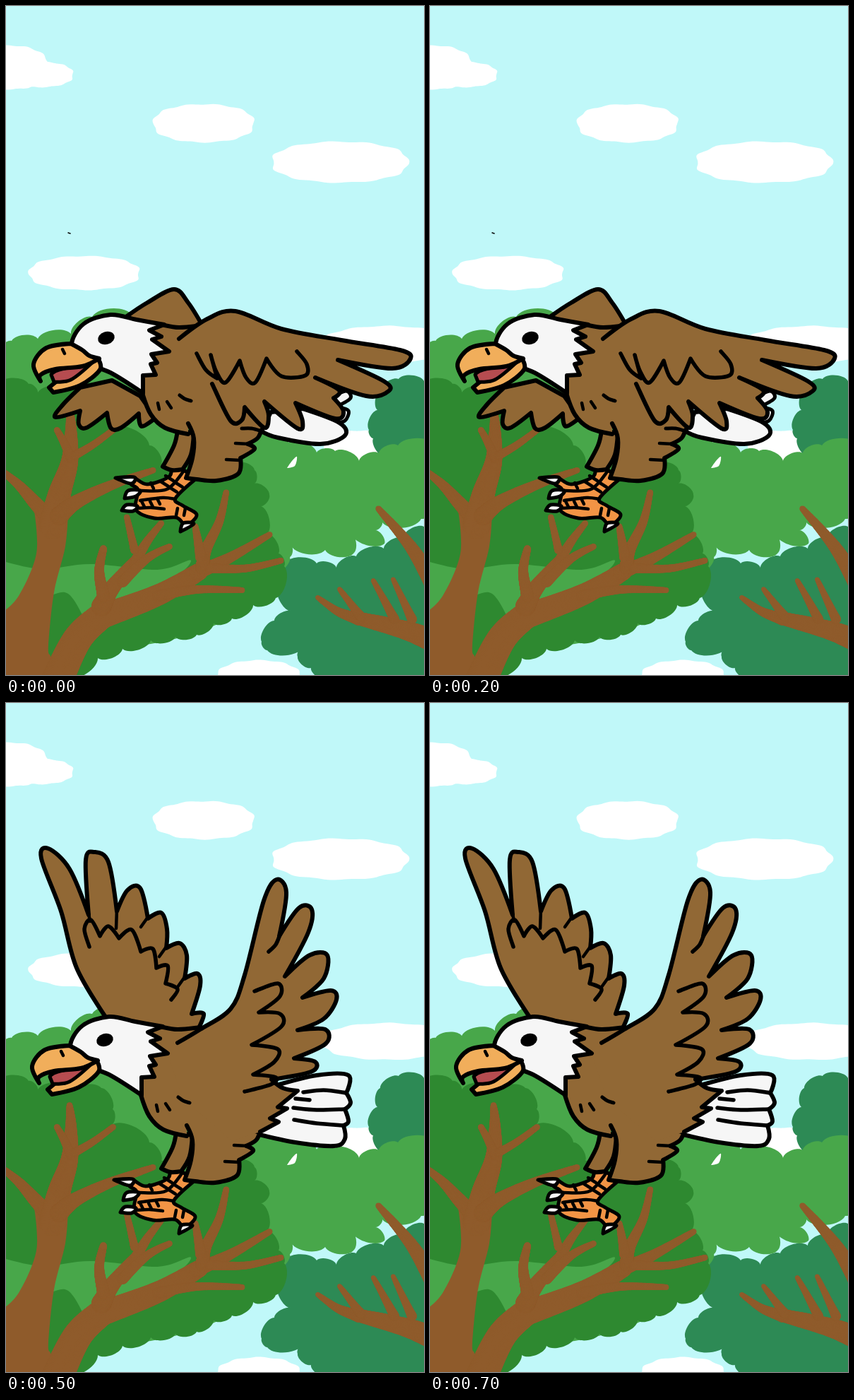
An HTML page with a canvas that plays this animation: 592x947 px, repeating every 1800 ms.

```html
<!DOCTYPE html>
<html lang="en">
<head>
<meta charset="utf-8">
<title>Flying eagle</title>
<style>
  html, body { margin: 0; width: 100%; height: 100%; overflow: hidden; background: #c0f8f9; }
  canvas { display: block; }
</style>
</head>
<body>
<canvas id="stage" width="592" height="947"></canvas>
<script>
const ctx = document.getElementById('stage').getContext('2d');
const SKY = '#c0f8f9', LEAF = '#48a74a', DARK_LEAF = '#2e8930', TEAL = '#2d8a55', WOOD = '#8f5b2b';
const FEATHER = '#916835', WHITE = '#f6f6f6', BEAK = '#f1ae5b', MOUTH = '#b64c50', FOOT = '#f29445';

// Points are "x,y"; a trailing "!" marks a sharp corner.
function parse(text) {
  return text.trim().split(/\s+/).map(item => {
    const [x, y] = item.split(',').map(parseFloat);
    return { x, y, sharp: item.endsWith('!') };
  });
}

// Smooth curve through all points.
function trace(text, closed) {
  const pts = parse(text), n = pts.length;
  const at = i => closed ? pts[(i + n) % n] : pts[Math.max(0, Math.min(n - 1, i))];
  const handle = (p, from, to) => p.sharp ? [p.x, p.y] : [p.x + (to.x - from.x) / 6, p.y + (to.y - from.y) / 6];
  ctx.beginPath();
  ctx.moveTo(pts[0].x, pts[0].y);
  for (let i = 0; i < (closed ? n : n - 1); i++) {
    const a = at(i), b = at(i + 1);
    ctx.bezierCurveTo(...handle(a, at(i - 1), b), ...handle(b, at(i + 2), a), b.x, b.y);
  }
  if (closed) ctx.closePath();
}

function fill(color, text) {
  trace(text, true);
  ctx.fillStyle = color;
  ctx.fill();
}

function line(width, text) {
  trace(text, false);
  ctx.lineWidth = width;
  ctx.stroke();
}

function inked(color, text, width = 6) {
  fill(color, text);
  ctx.lineWidth = width;
  ctx.stroke();
}

function ticks(text, dx, dy) {
  for (const { x, y } of parse(text)) line(4.5, `${x},${y} ${x + dx},${y + dy}`);
}

function shifted(dx, dy, draw) {
  ctx.save();
  ctx.translate(dx, dy);
  draw();
  ctx.restore();
}

function cloud(x, y, rx, ry) {
  ctx.beginPath();
  for (let a = 0; a < 2 * Math.PI; a += 0.05) {
    const wobble = 1 + 0.025 * Math.sin(11 * a + x), s = Math.sin(a);
    ctx.lineTo(x + rx * wobble * Math.cos(a), y + ry * wobble * Math.sign(s) * Math.abs(s) ** 0.8);
  }
  ctx.fillStyle = '#fff';
  ctx.fill();
}

// Leaf mass: a bump swells outward between each pair of points, clockwise.
function foliage(color, text) {
  const pts = parse(text);
  ctx.beginPath();
  ctx.moveTo(pts[0].x, pts[0].y);
  pts.forEach((a, i) => {
    const b = pts[(i + 1) % pts.length], dx = b.x - a.x, dy = b.y - a.y;
    ctx.bezierCurveTo(a.x + dx * 0.15 + dy * 0.25, a.y + dy * 0.15 - dx * 0.25,
      b.x - dx * 0.15 + dy * 0.25, b.y - dy * 0.15 - dx * 0.25, b.x, b.y);
  });
  ctx.fillStyle = color;
  ctx.fill();
}

// Limb whose radius tapers along a chain of points.
function branch(r0, r1, text) {
  const pts = parse(text), last = pts.length - 1;
  const spline = (key, i, u) => {
    const [p, a, b, q] = [-1, 0, 1, 2].map(k => pts[Math.max(0, Math.min(last, i + k))][key]);
    return a + u * (b - p + u * (2 * p - 5 * a + 4 * b - q + u * (3 * (a - b) + q - p))) / 2;
  };
  ctx.fillStyle = WOOD;
  for (let t = 0; t <= last; t += 0.02) {
    const i = Math.min(last - 1, Math.floor(t));
    ctx.beginPath();
    ctx.arc(spline('x', i, t - i), spline('y', i, t - i), r0 + (r1 - r0) * t / last, 0, 7);
    ctx.fill();
  }
}

function drawClouds() {
  cloud(8, 87, 52, 31);
  cloud(48, 97, 47, 18);
  cloud(280, 166, 71, 27);
  cloud(473, 221, 96, 29);
  cloud(111, 378, 78, 24);
  cloud(540, 479, 92, 26);
  cloud(500, 626, 49, 25);
  cloud(358, 952, 60, 26);
}

function drawFoliage() {
  foliage(TEAL, '514,600 526,572 530,545 556,528 592,531 610,545 610,640 540,640 520,612');
  foliage(TEAL, `362,900 380,870 404,857 385,818 396,788 440,789 468,795 496,779 535,768 562,753 592,737 610,730
    610,950 445,950 432,937 413,921 420,908 370,912`);
  foliage(LEAF, `-10,490 8,474 45,471 92,464 122,440 178,437 270,480 360,590 400,618 440,632 466,630 500,644 528,633
    555,622 610,622 610,700 588,726 533,731 523,742 536,761 490,748 492,775 452,770 404,764 402,780 385,800 -10,860`);
  fill('#fff', '398,654! 405,644 412,638 409,651');
  foliage(DARK_LEAF, `-10,534 32,535 45,547 100,547 135,545 151,575 150,597 203,622 220,648 250,680 330,647 352,657
    352,676 373,692 361,708 370,747 386,775 394,793 382,838 350,848 320,867 294,874 270,890 240,893 205,898 165,910
    130,923 92,950 -10,950`);
  fill(LEAF, '-10,784! 50,797 120,790 215,798 262,785 225,822 150,860 112,884 108,862 88,832 65,834 40,850 -10,865!');
}

function drawBranches() {
  fill(WOOD, '-10,950! -10,862! 18,835 43,775 40,715! 88,715! 84,765 68,830 60,905 62,918! 75,950!');
  branch(12, 4, '64,728 40,702 18,678 -6,658');
  branch(20, 4, '66,735 76,690 90,645 92,600 90,569');
  branch(7, 4, '92,640 82,618 72,600');
  branch(6, 4, '98,636 125,620 152,600');
  branch(13, 4, '75,722 100,702 150,678 209,657');

  branch(23, 18, '70,960 102,895 142,858');
  branch(18, 12, '130,866 215,834 275,800');
  branch(11, 4, '270,802 315,782 374,748');
  branch(10, 4, '278,795 283,770 302,730 312,688');
  branch(8, 4, '276,780 268,736');
  branch(7, 4, '290,796 340,796 390,785');
  branch(8, 4, '215,835 270,826 335,827');
  branch(14, 8, '135,850 150,824 182,787');
  branch(8, 4, '182,788 200,758 220,732');
  branch(6, 4, '182,770 171,723');
  branch(9, 5, '138,835 132,800 138,768');
  branch(8, 4, '165,815 200,782 232,765');

  branch(18, 9, '620,905 570,885 500,867');
  branch(9, 3, '500,868 470,857 441,837');
  branch(7, 3, '502,864 472,825');
  branch(7, 3, '550,868 535,840 520,813');
  branch(7, 3, '575,868 548,811');
  branch(14, 4, '612,830 575,768 527,711');
}

function drawFeet() {
  inked(FOOT, `234,655! 230,667 200,677 181,668 177,677 187,685 184,713 210,725 241,724 255,735 270,720
    250,707 240,697 268,670! 250,655!`, 5);
  inked(WHITE, '155,668! 182,667 177,676', 5);
  inked(WHITE, '168,697! 173,686 190,686 184,694', 5);
  inked(WHITE, '164,714! 171,706 186,708 180,715', 5);
  inked(WHITE, '247,744! 251,732 266,733', 5);
  line(4.5, '252,658 228,684 190,686');
  line(4.5, '190,700 222,696 240,698');
  line(4.5, '186,711 205,710 224,712');
  ticks('226,665 219,673 239,674 231,681', 11, 7);
  ticks('205,675 204,701 214,697 192,701', 4, 8);
  ticks('243,711 254,711', -2, 10);
}

// Body, legs and feet share one drawing in both poses.
function drawBody() {
  const rump = '362,600 356,612 342,620! 352,627 332,640! 329,662 298,672 270,670 255,668! ';
  const thigh = '264,640 266,612 258,591! ';
  const breast = '258,606! 225,597 205,578 193,548!';
  drawFeet();
  inked(FEATHER, '243,600! 238,622 222,652! 235,657 250,656! 262,635 266,605!');
  fill(FEATHER, rump + thigh + breast + ' 195,455! 280,452! 310,480! 345,560!');
  line(6, rump + thigh);
  line(6, breast);
  line(6, '220,451 245,455 278,452');
  line(5, '334,598 348,598 362,602');
  ticks('325,619 312,642', 19, 1);
  ticks('215,562', 2, 9);
}

function drawBreastMarks() {
  ticks('228,560', 6, 9);
  line(5, '246,551 253,556 262,559');
}

function drawHead() {
  inked(WHITE, `93,480 110,450 148,437 185,444 224,451! 203,459! 220,468! 207,472! 231,489! 206,493! 214,505!
    205,507! 212,522! 194,523! 194,548! 148,519 112,505`);
  inked(BEAK, '72,531! 61,540! 67,547! 105,537 133,515 130,499! 110,505!');
  inked(MOUTH, '64,522! 75,515 122,505! 92,529 68,532!', 5);
  inked(BEAK, '92,478! 57,484 39,507 49,531! 49,522 70,514 108,510 132,499! 118,495 108,487');
  line(4.5, '80,486 83,492');
  ctx.beginPath();
  ctx.ellipse(142, 470, 12, 9, -0.3, 0, 7);
  ctx.fillStyle = '#000';
  ctx.fill();
}

function drawGlide() {
  line(1.5, '88,321 91,322');
  inked(FEATHER, '170,440! 200,420 238,401 258,420 278,452! 225,470!');
  inked(WHITE, '465,552! 482,545 488,555 470,566!', 5);
  inked(WHITE, '470,568! 485,573 480,587 465,590!', 5);
  inked(WHITE, '362,602! 375,575! 420,570! 472,590 480,608 445,620 385,611');
  inked(FEATHER, `105,540! 80,565 70,582 105,573! 103,592 114,597 143,576! 149,598 163,597 188,577! 192,595 212,583!
    190,552! 150,530!`);
  drawBody();
  drawBreastMarks();
  drawHead();
  const wing = `245,471! 285,443 325,432 390,457 475,473 558,487 573,499 547,513 470,501! 535,531 542,545 510,552
    438,526! 472,544 464,555! 478,574 466,584 410,562! 420,588 413,598 366,560! 372,580 366,597 338,568! 334,586
    318,587 292,535`;
  fill(FEATHER, wing);
  line(6, wing);
  line(5.5, `270,492 283,515 299,527! 290,494! 298,518 311,533 331,502! 340,526 353,533 369,499! 390,524 424,523
    426,507 412,489`);
}

function drawUpstroke() {
  inked(FEATHER, `142,446! 100,375 78,295 50,220 60,206 90,235 117,300! 113,222 125,211 145,225 157,295! 172,265
    190,262 201,305! 220,297 228,320 227,347! 246,340 256,357 253,390! 271,383 275,400 263,440! 280,440 272,462! 215,465!`);
  line(5.5, `118,345 111,320 120,307 133,330! 145,316 160,333! 178,321 191,352! 208,348 213,375! 229,372 226,397!
    243,405 234,420`);
  ticks('117,298', 2, 11);
  ticks('157,292', -1, 27);
  ticks('201,303 227,345 253,388', -10, 14);
  inked(WHITE, `380,542! 440,527 485,527 482,552! 488,566 480,575! 485,592 478,598! 480,617 465,627 410,622 355,610!`);
  line(5.5, '421,551 450,548 482,552');
  line(5.5, '410,560 430,562');
  line(5.5, '407,573 440,576 480,575');
  line(5.5, '408,590 440,595 478,598');

  shifted(-2, 7, drawBody);
  const wing = `243,481! 275,462 318,433 338,385 365,280 383,250 397,268 387,330! 415,290 433,292 428,325 395,387!
    430,357 455,357 450,390 420,417! 460,407 468,420 450,447 413,463! 452,462 453,482 408,503! 438,508 432,522 376,533!`;
  const flank = ' 392,545 413,549! 385,572! 398,574! 374,588! 386,593! 360,607!';
  fill(FEATHER, wing + flank + ' 320,620! 250,560! 230,500!');
  line(6, wing + flank);
  line(5.5, '388,328 382,342 372,352');
  line(5.5, `352,408 385,397 388,415 358,438! 388,440 390,458 348,484! 385,490 380,508 350,526! 382,530 375,540 338,550`);
  shifted(-2, 7, drawBreastMarks);
  shifted(-2, 7, drawHead);
}

function drawScene(wingsUp) {
  ctx.fillStyle = SKY;
  ctx.fillRect(0, 0, 592, 947);
  ctx.strokeStyle = '#000';
  ctx.lineCap = ctx.lineJoin = 'round';
  drawClouds();
  drawFoliage();
  drawBranches();
  if (wingsUp) drawUpstroke();
  else drawGlide();
}

// Flap every 100 ms, then hold the wings up until the loop ends.
let shown = null;
function tick() {
  const time = performance.now() % 1800;
  const wingsUp = time >= 700 || Math.floor(time / 100) % 2 === 1;
  if (wingsUp !== shown) drawScene(shown = wingsUp);
  requestAnimationFrame(tick);
}
tick();
</script>
</body>
</html>
```
